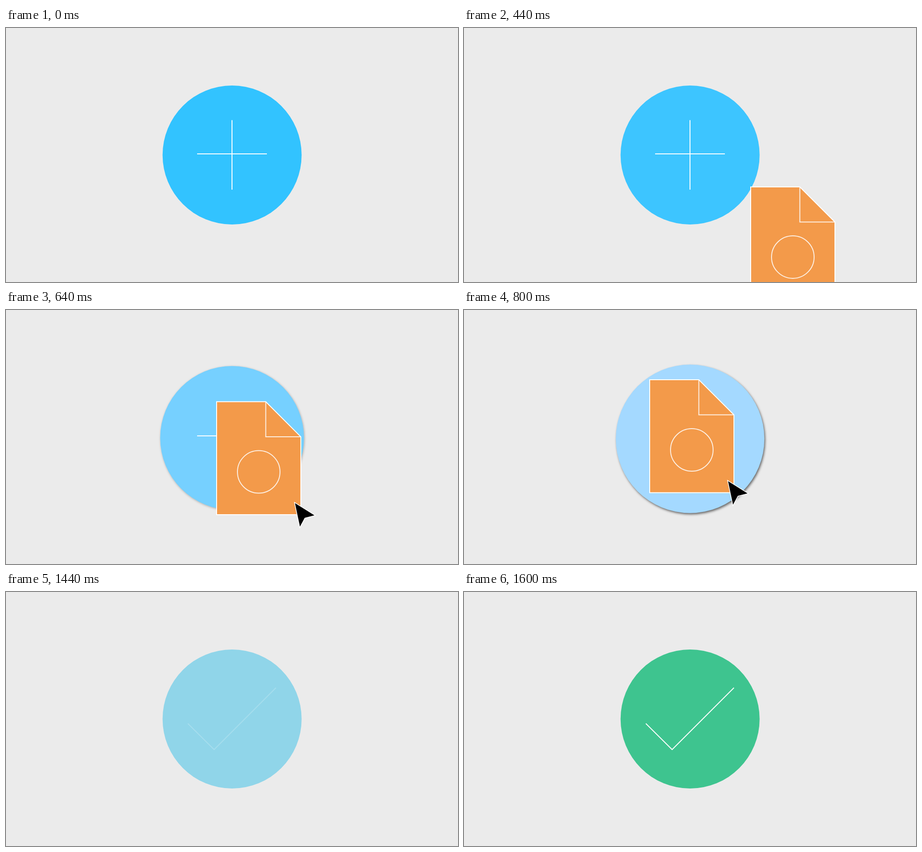
An HTML page with a canvas that plays this animation: 998x561 px, repeating every 2 s.

```html
<!DOCTYPE html>
<html lang="en">
<head>
<meta charset="utf-8">
<title>Drop a file</title>
<style>
  html, body { margin: 0; width: 100%; height: 100%; overflow: hidden; background: #ebebeb; }
  canvas { display: block; }
</style>
</head>
<body>
<canvas width="998" height="561"></canvas>
<script>
const ctx = document.querySelector('canvas').getContext('2d');
const LOOP = 2000, STEP = 40;
const BLUE = [50, 195, 255], PALE = [164, 217, 255], GREEN = [62, 196, 143];

const progress = (t, from, to) => Math.min(1, Math.max(0, (t - from) / (to - from)));
const mix = (a, b, p) => a + (b - a) * p;
const mixColor = (a, b, p) => `rgb(${a.map((v, i) => mix(v, b[i], p))})`;

function trace(points, close) {
  ctx.beginPath();
  points.forEach(([x, y]) => ctx.lineTo(x, y));
  if (close) ctx.closePath();
}

function strokeLine(points, color = '#fff', width = 2) {
  trace(points);
  ctx.strokeStyle = color;
  ctx.lineWidth = width;
  ctx.stroke();
}

function disc(lift, color) {
  ctx.save();
  if (lift > 0) {
    ctx.shadowColor = `rgba(0, 0, 0, ${0.55 * lift})`;
    ctx.shadowBlur = 5;
    ctx.shadowOffsetX = 2 * lift;
    ctx.shadowOffsetY = 3 * lift;
  }
  ctx.beginPath();
  ctx.arc(499.2, mix(280.5, 284.5, lift), mix(153.5, 164, lift), 0, 2 * Math.PI);
  ctx.fillStyle = color;
  ctx.fill();
  ctx.restore();
}

function plus() {
  strokeLine([[422, 278], [576, 278]]);
  strokeLine([[499, 203.5], [499, 357]]);
}

function paper() {
  trace([[410, 154], [518.5, 154], [596, 231.5], [596, 403.5], [410, 403.5]], true);
  ctx.fillStyle = '#f39a4a';
  ctx.fill();
  ctx.strokeStyle = '#fff';
  ctx.lineWidth = 2;
  ctx.stroke();

  const soft = 'rgba(255, 255, 255, 0.85)';
  strokeLine([[518.5, 154], [518.5, 231.5], [596, 231.5]], soft);
  ctx.beginPath();
  ctx.arc(503, 309, 47, 0, 2 * Math.PI);
  ctx.stroke();
}

function pointer() {
  trace([[583, 378], [626, 405], [604.5, 410.5], [594, 430]], true);
  ctx.strokeStyle = '#fff';
  ctx.lineWidth = 3;
  ctx.stroke();
  ctx.fillStyle = '#000';
  ctx.fill();
}

function draggedFile(t) {
  const distance = 0.84 * Math.max(0, 705.5 - t);
  const scale = 1 - progress(t, 1200, 1320);
  ctx.save();
  ctx.translate(520 + distance, 294 + 0.883 * distance);
  ctx.scale(scale, scale);
  ctx.translate(-520, -294);
  paper();
  pointer();
  ctx.restore();
}

function draw(t) {
  ctx.fillStyle = '#ebebeb';
  ctx.fillRect(0, 0, 998, 561);

  const lift = progress(t, 480, 800) - progress(t, 1280, 1400);
  const done = progress(t, 1400, 1600);
  disc(lift, t < 1400
    ? mixColor(BLUE, PALE, progress(t, 400, 800))
    : mixColor(PALE, GREEN, done));

  if (t < 720) plus();
  if (t >= 200 && t < 1320) draggedFile(t);
  if (done > 0) {
    strokeLine([[401.5, 290.5], [459.5, 348], [596, 211.5]], `rgba(255, 255, 255, ${done})`);
  }
}

const start = performance.now();
function frame() {
  const t = (performance.now() - start) % LOOP;
  draw(Math.floor(t / STEP) * STEP);
  requestAnimationFrame(frame);
}
frame();
</script>
</body>
</html>
```
